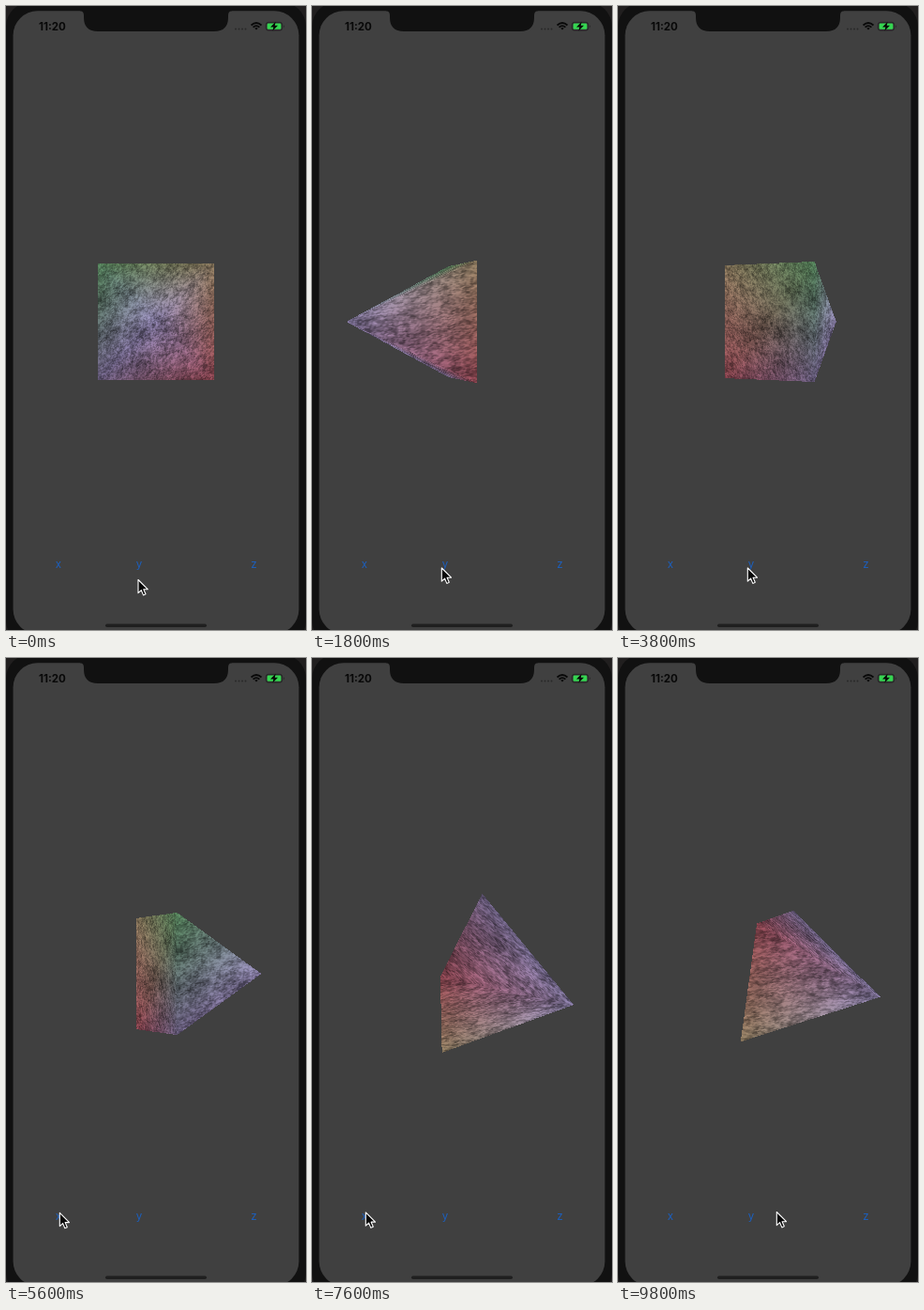
These frames come from a looping animation (320x664 px, 10 s). An HTML page with a canvas:

```html
<!DOCTYPE html>
<html lang="en">
<head>
<meta charset="utf-8">
<title>Rotating pyramid</title>
<style>
  html, body { margin: 0; width: 100%; height: 100%; overflow: hidden; background: #111; }
  #stage { position: relative; width: 320px; height: 664px; overflow: hidden; }
  svg, canvas { position: absolute; left: 0; display: block; }
  svg { top: 0; }
  canvas { top: 226px; }
  text { font-family: Inter, "Liberation Sans", sans-serif; }
</style>
</head>
<body>
<div id="stage">
  <svg width="320" height="664" viewBox="0 0 320 664">
    <rect width="320" height="664" fill="#211f1f"/>
    <rect y="-4" width="320" height="684" rx="26" fill="#111"/>
    <rect x="7.6" y="5.3" width="304.8" height="662.7" rx="26" fill="#404040"/>
    <path d="M79 4V5.3Q83 5.3 83 10V12Q83 27 98 27H222Q237 27 237 12V10Q237 5.3 241 5.3V4Z" fill="#111"/>
    <text x="35" y="26" font-size="11.5" font-weight="700" fill="#080808">11:20</text>
    <g fill="#292929">
      <circle cx="245" cy="24.5" r="1"/><circle cx="248.5" cy="24.5" r="1"/>
      <circle cx="252" cy="24.5" r="1"/><circle cx="255.5" cy="24.5" r="1"/>
    </g>
    <g fill="none" stroke="#080808" stroke-width="1.8">
      <path d="M261.5 20.5Q267 15.5 272.5 20.5M263.6 22.7Q267 19.6 270.4 22.7"/>
      <path d="M265.3 23.8Q267 22.4 268.7 23.8L267 25.6Z" fill="#080808" stroke="none"/>
    </g>
    <rect x="277.3" y="17.3" width="17.4" height="8.8" rx="2.6" fill="#333" stroke="#222" stroke-width=".8"/>
    <rect x="278.6" y="18.6" width="14.8" height="6.2" rx="1.4" fill="#35d651"/>
    <path d="M296 20V23.5Q297.6 21.8 296 20Z" fill="#222"/>
    <path d="M287.6 16.8L282 22.5H285.3L284.4 26.6L290 20.8H286.8Z" fill="#080808"/>
    <g font-size="11.5" fill="#1c5fbd" text-anchor="middle">
      <text x="56" y="598">x</text>
      <text x="142" y="598">y</text>
      <text x="264.5" y="598">z</text>
    </g>
    <rect x="106" y="657.5" width="108" height="3.5" rx="1.75" fill="#1f1f1f"/>
    <path id="cursor" d="M0 0V14.2L3.3 11.2L5.5 16.4L8 15.3L5.8 10.2H10.2Z" fill="#080808" stroke="#fff" stroke-width="1.1" stroke-linejoin="round"/>
  </svg>
  <canvas id="view" width="320" height="220"></canvas>
</div>
<script>
const LOOP = 10000, STEP = 200;
const CENTER_X = 160, CENTER_Y = 110, DISTANCE = 1220, HALF = 62;

// Each vertex: position in half-sides, then its colour.
const vertices = [
  { pos: [-1, 1, 0], rgb: [80, 124, 86] },
  { pos: [1, 1, 0], rgb: [140, 122, 94] },
  { pos: [1, -1, 0], rgb: [150, 74, 86] },
  { pos: [-1, -1, 0], rgb: [106, 94, 128] },
  { pos: [0, 0, 2], rgb: [144, 132, 176] }
];
const faces = [[0, 1, 4], [1, 2, 4], [2, 3, 4], [3, 0, 4], [0, 3, 2], [0, 2, 1]];

// Turns in degrees about the screen axes, applied in this order.
const yaw = [[715, 0], [1800, 76], [2600, 136], [3800, 219.3], [4230, 249.7], [8800, 249.7], [8950, 253]];
const pitch = [[5720, 0], [7600, -131.4], [8130, -168]];
const roll = [[8800, 0], [8950, -8]];
const cursorX = [[0, 141], [600, 138.3], [4400, 138.3], [5100, 57.3], [8200, 57.3], [8750, 260], [9150, 260], [9800, 169.3]];
const cursorY = [[0, 610.5], [600, 598], [4400, 598], [5100, 590.5], [9800, 589.5]];

function valueAt(track, t) {
  if (t <= track[0][0]) return track[0][1];
  for (let i = 1; i < track.length; i++) {
    const [t0, v0] = track[i - 1], [t1, v1] = track[i];
    if (t < t1) return v0 + (v1 - v0) * (t - t0) / (t1 - t0);
  }
  return track[track.length - 1][1];
}

function hash(x, y) {
  let h = Math.imul(x, 374761393) + Math.imul(y, 668265263);
  h = Math.imul(h ^ (h >>> 13), 1274126177);
  return ((h ^ (h >>> 16)) >>> 0) / 4294967296;
}

function noise(x, y) {
  const ix = Math.floor(x), iy = Math.floor(y);
  const smooth = f => f * f * (3 - 2 * f);
  const fx = smooth(x - ix), fy = smooth(y - iy);
  const top = hash(ix, iy) * (1 - fx) + hash(ix + 1, iy) * fx;
  const low = hash(ix, iy + 1) * (1 - fx) + hash(ix + 1, iy + 1) * fx;
  return top * (1 - fy) + low * fy;
}

// Rock surface: patches and fine grain, stretched along a diagonal.
const SIZE = 256;
const rock = new Float32Array(SIZE * SIZE);
for (let y = 0; y < SIZE; y++) {
  for (let x = 0; x < SIZE; x++) {
    const along = (x - y) * 0.35, across = (x + y) * 0.7;
    const patches = noise(along / 22 + 40, across / 30 + 40);
    const cracks = noise(along / 4.5 + 90, across / 6 + 90);
    const grain = noise(along / 1.5 + 150, across / 2 + 150);
    const level = 0.3 * patches + 0.3 * cracks + 0.4 * grain;
    rock[y * SIZE + x] = Math.max(0.5, Math.min(1.15, 0.88 + (level - 0.5) * 1.15));
  }
}

function turn(a, b, degrees) {
  const r = degrees * Math.PI / 180, c = Math.cos(r), s = Math.sin(r);
  return [a * c - b * s, a * s + b * c];
}

function project({ pos, rgb }, t) {
  let [x, y, z] = pos.map(v => v * HALF);
  [x, z] = turn(x, z, valueAt(yaw, t));
  [y, z] = turn(y, z, valueAt(pitch, t));
  [x, y] = turn(x, y, valueAt(roll, t));
  const scale = DISTANCE / (DISTANCE - z);
  return {
    x: CENTER_X + x * scale,
    y: CENTER_Y - y * scale,
    u: (pos[0] + 1) / 2 * (SIZE - 1),
    v: (1 - pos[1]) / 2 * (SIZE - 1),
    rgb
  };
}

const canvas = document.getElementById("view");
const ctx = canvas.getContext("2d");
const cursor = document.getElementById("cursor");
const cross = (a, b, x, y) => (b.x - a.x) * (y - a.y) - (b.y - a.y) * (x - a.x);

function fillFace(image, a, b, c) {
  const area = cross(a, b, c.x, c.y);
  if (area <= 0.5) return;
  const xs = [a.x, b.x, c.x], ys = [a.y, b.y, c.y];
  const left = Math.floor(Math.min(...xs)), right = Math.ceil(Math.max(...xs));
  const top = Math.max(0, Math.floor(Math.min(...ys)));
  const bottom = Math.min(image.height, Math.ceil(Math.max(...ys)));
  for (let y = top; y < bottom; y++) {
    for (let x = left; x < right; x++) {
      const wa = cross(b, c, x + 0.5, y + 0.5) / area;
      const wb = cross(c, a, x + 0.5, y + 0.5) / area;
      const wc = 1 - wa - wb;
      if (wa < 0 || wb < 0 || wc < 0) continue;
      const u = Math.round(a.u * wa + b.u * wb + c.u * wc);
      const v = Math.round(a.v * wa + b.v * wb + c.v * wc);
      const shade = rock[v * SIZE + u];
      const at = (y * image.width + x) * 4;
      for (let k = 0; k < 3; k++) {
        image.data[at + k] = shade * (a.rgb[k] * wa + b.rgb[k] * wb + c.rgb[k] * wc);
      }
      image.data[at + 3] = 255;
    }
  }
}

function draw(t) {
  const points = vertices.map(vertex => project(vertex, t));
  const image = ctx.createImageData(canvas.width, canvas.height);
  for (const face of faces) fillFace(image, ...face.map(i => points[i]));
  ctx.putImageData(image, 0, 0);
  cursor.setAttribute("transform", `translate(${valueAt(cursorX, t)} ${valueAt(cursorY, t)})`);
}

const start = performance.now();
let shown = -1;
function tick() {
  const elapsed = Math.max(0, performance.now() - start) % LOOP;
  const t = Math.floor(elapsed / STEP) * STEP;
  if (t !== shown) draw(shown = t);
  requestAnimationFrame(tick);
}
tick();
</script>
</body>
</html>
```
